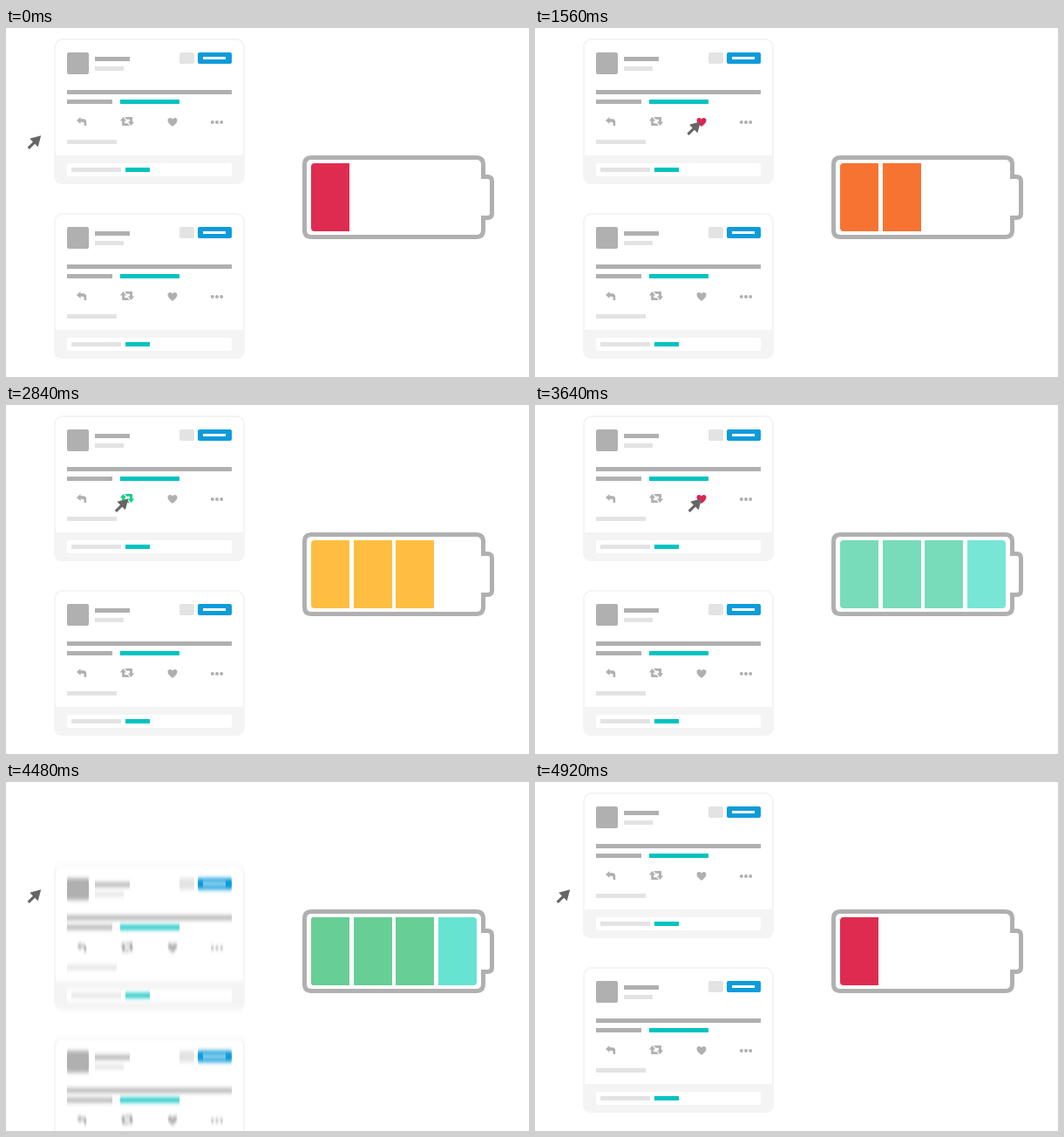
An HTML page that plays this animation: 600x400 px, repeating every 5.56 s.

```html
<!DOCTYPE html>
<html lang="en">
<head>
<meta charset="utf-8">
<title>Battery charged by clicks</title>
<style>
  html, body { margin: 0; width: 100%; height: 100%; overflow: hidden; background: #fff; }
  svg { display: block; width: 600px; height: 400px; }
  .mid { fill: #b0b0b0; }
  .pale { fill: #e3e3e3; }
  .teal { fill: #00c3c0; }
  .blue { fill: #0c9bdb; }
  .white { fill: #fff; }
  #ring { mix-blend-mode: multiply; }
</style>
</head>
<body>
<svg viewBox="0 0 600 400">
  <defs>
    <clipPath id="inner"><rect x="350" y="155" width="190" height="78" rx="4"/></clipPath>
    <filter id="blur0" filterUnits="userSpaceOnUse" x="40" y="-60" width="250" height="320" color-interpolation-filters="sRGB"><feGaussianBlur stdDeviation="0 0"/></filter>
    <filter id="blur1" filterUnits="userSpaceOnUse" x="40" y="-60" width="250" height="320" color-interpolation-filters="sRGB"><feGaussianBlur stdDeviation="0 0"/></filter>
  </defs>

  <g id="cards"></g>

  <g id="ring">
    <circle id="disc" fill="#eee"/>
    <circle id="halo" fill="none" stroke="#e2e2e2"/>
  </g>

  <g id="levels" clip-path="url(#inner)"></g>
  <path fill="none" stroke="#b0b0b0" stroke-width="5" d="M547.5 170.5V156.5Q547.5 148.5 539.5 148.5H350.5Q342.5 148.5 342.5 156.5V231.5Q342.5 239.5 350.5 239.5H539.5Q547.5 239.5 547.5 231.5V217.5H552.5Q557.5 217.5 557.5 212.5V175.5Q557.5 170.5 552.5 170.5Z"/>

  <path id="cursor" fill="#666" d="M40.2 123.2L27.2 126.8L30.9 130.5L24.6 136.8L26.8 139L33.1 132.7L36.7 136.3Z"/>
</svg>

<script>
const LOOP = 5560, STEP = 40;
const $ = id => document.getElementById(id);
const bar = (cls, x, y, w, h = 5, r = 0) =>
  `<rect class="${cls}" x="${x}" y="${y}" width="${w}" height="${h}" rx="${r}"/>`;

const card = i => `<g id="card${i}">
  <rect x="56" y="13" width="217" height="165" rx="9" fill="#fff" stroke="#f4f4f4" stroke-width="2"/>
  <path fill="#f4f4f4" d="M55 146H274V169Q274 179 264 179H65Q55 179 55 169Z"/>
  ${bar('mid', 70, 28, 25, 25, 2)}${bar('mid', 102, 33, 40)}${bar('pale', 102, 44, 33)}
  ${bar('pale', 199, 28, 17, 13, 2)}${bar('blue', 220, 28, 39, 13, 2)}${bar('white', 226, 33, 26, 3)}
  ${bar('mid', 70, 71, 189)}${bar('mid', 70, 82, 52)}${bar('teal', 131, 82, 68)}
  <path class="mid" d="M81 106L85.5 102V104.3H88.8Q92.2 104.3 92.2 108V112H89.6V109.2Q89.6 107.7 88 107.7H85.5V110Z"/>
  <path class="mid" id="share${i}" d="M134.5 102L138.2 106.4H136V109.3H139.5L142 112H133.2V106.4H130.8ZM143.5 112L139.8 107.6H142.1V104.7H138.5L136 102H145V107.6H147.2Z"/>
  <path class="mid" id="heart${i}" d="M191 113C188 110.5 185.5 108.5 185.5 105.8C185.5 102.6 189.5 102 191 104.6C192.5 102 196.5 102.6 196.5 105.8C196.5 108.5 194 110.5 191 113Z"/>
  ${[236.8, 242, 247.2].map(x => `<circle class="mid" cx="${x}" cy="108" r="2"/>`).join('')}
  ${bar('pale', 70, 128, 57)}
  ${bar('white', 70, 155, 189, 15, 2)}${bar('pale', 75, 160, 57)}${bar('teal', 137, 160, 28)}
</g>`;
$('cards').innerHTML = card(0) + card(1);

// Each level is a full set of cells in one colour, stacked over the previous one.
$('levels').innerHTML = ['#e02b50', '#f77331', '#ffbe41', '#21d6bd'].map((fill, n) =>
  `<g fill="${fill}">${[350, 399, 447, 496].slice(0, n + 1).map(x =>
    `<rect x="${x}" y="155" width="44" height="78"/>`).join('')}</g>`).join('');
const levels = [...$('levels').children];

const part = (t, a, b) => Math.min(1, Math.max(0, (t - a) / (b - a)));
const ease = (t, a, b) => { const s = part(t, a, b); return s * s * (3 - 2 * s); };
const bump = (t, a, b) => Math.sin(Math.PI * part(t, a, b));
const mix = (a, b, s) => a + (b - a) * s;

const clicks = [
  { at: 40, x: 191, charge: 720 },
  { at: 1560, x: 139, charge: 2200 },
  { at: 2840, x: 191, charge: 3480 }
];
const drains = [4760, 4590, 4420];

function drop(t) {
  return t < 4150 ? 410 * part(t, 3920, 4140) ** 3
                  : 410 * (1 - part(t, 4168, 4920)) ** 3;
}

function drawCards(t) {
  const y = drop(t), speed = Math.abs(drop(t + 20) - drop(t - 20));
  const sd = y > 0 ? speed * 0.107 : 0;
  [1, 0.975].forEach((k, i) => {
    const el = $('card' + i);
    el.setAttribute('transform', `translate(0 ${i * 200 + y * k})`);
    if (sd > 0.1) {
      $('blur' + i).firstElementChild.setAttribute('stdDeviation', `0 ${sd}`);
      el.setAttribute('filter', `url(#blur${i})`);
    } else el.removeAttribute('filter');
  });
}

function drawCursor(t) {
  const out = ease(t, 0, 440), back = ease(t, 3840, 4200);
  const s = out * (1 - back);
  let x = 2 * s * (1 - s) * 70 + s * s * 151;
  const y = 2 * s * (1 - s) * 15 - s * s * 16;
  x += -52 * (ease(t, 1520, 1960) - ease(t, 2800, 3240)) - 4 * bump(t, 4140, 4360);
  const size = 1 + clicks.reduce((sum, c) => sum + 0.13 * bump(t, c.at + 420, c.at + 700), 0);
  $('cursor').setAttribute('transform',
    `translate(${x + 32.4} ${y + 131.1}) scale(${size}) translate(-32.4 -131.1)`);
}

function drawRing(t) {
  const c = clicks.find(k => t > k.at + 400 && t < k.at + 720);
  $('ring').style.display = c ? '' : 'none';
  if (!c) return;
  const grow = 1 - (1 - part(t, c.at + 400, c.at + 600)) ** 2;
  for (const [id, r] of [['disc', 13.2], ['halo', 16]]) {
    $(id).setAttribute('cx', c.x);
    $(id).setAttribute('cy', 107.5);
    $(id).setAttribute('r', r * grow);
  }
  $('ring').style.opacity = 1 - part(t, c.at + 560, c.at + 720);
}

function tint(id, rgb, s) {
  $(id).style.fill = `rgb(${rgb.map(v => mix(176, v, s)).join()})`;
}

function drawIcons(t) {
  const lit = (a, b) => ease(t, a, a + 80) * (1 - ease(t, b, b + 120));
  tint('heart0', [224, 35, 80], lit(480, 1600) + lit(3280, 3880));
  tint('share0', [23, 207, 134], lit(2000, 2880));
}

function drawLevels(t) {
  const draining = t >= 4200;
  levels.forEach((el, n) => {
    const on = n ? ease(t, clicks[n - 1].charge, clicks[n - 1].charge + 280) : 1;
    const off = n < 3 ? ease(t, clicks[n].charge, clicks[n].charge + 280) : 0;
    const drained = n ? ease(t, drains[n - 1], drains[n - 1] + 160) : 0;
    el.style.opacity = draining ? 1 - drained : on * (1 - off);
  });
}

const start = performance.now();
function draw() {
  const now = (performance.now() - start) % LOOP;
  const t = Math.floor(now / STEP) * STEP;
  drawCards(t);
  drawCursor(t);
  drawRing(t);
  drawIcons(t);
  drawLevels(t);
  requestAnimationFrame(draw);
}
draw();
</script>
</body>
</html>
```
